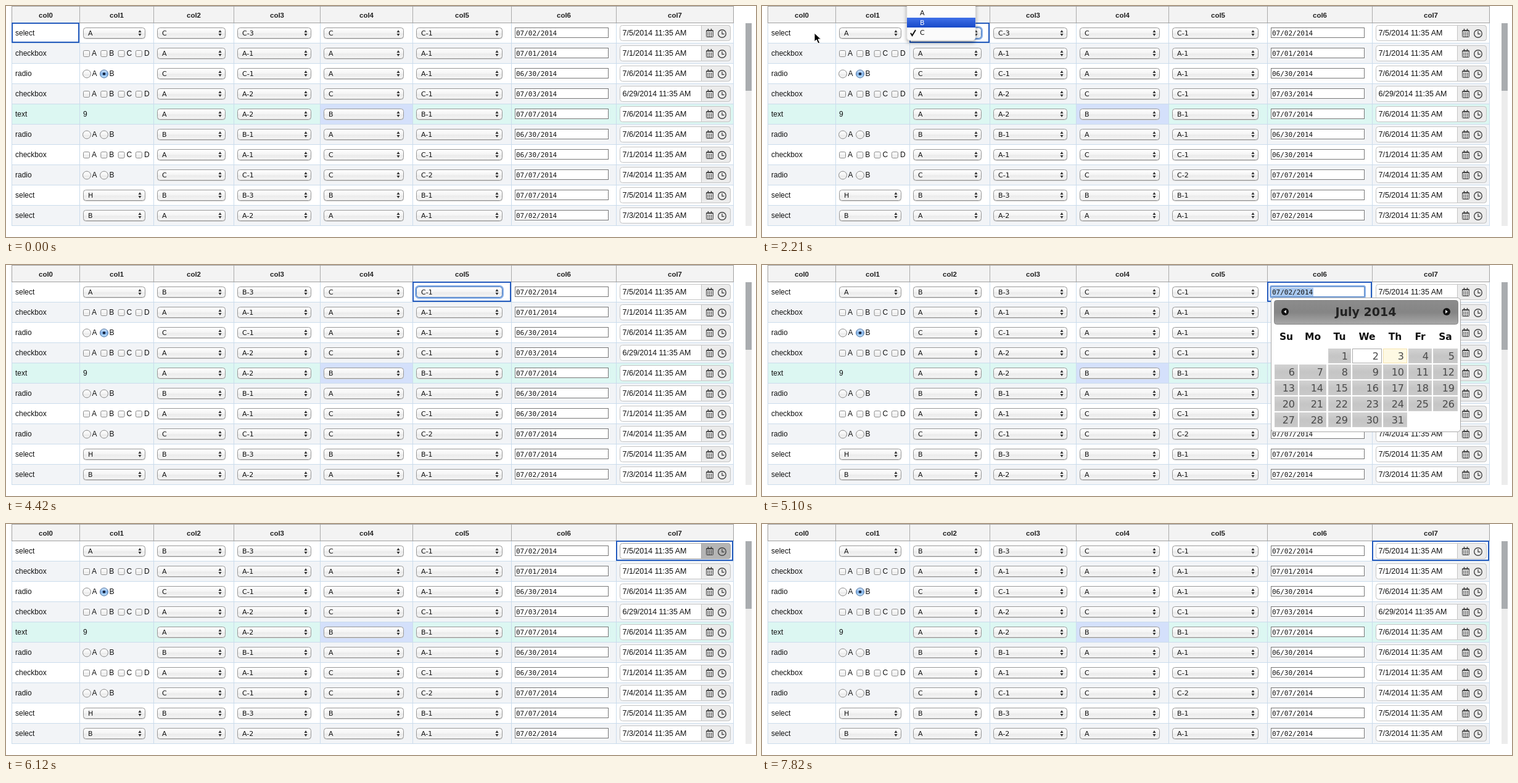
An HTML page for the animation above (7.99 s loop, 1216 px wide and 376 px high).

```html
<!DOCTYPE html>
<html lang="en">
<head>
<meta charset="utf-8">
<title>Grid editing</title>
<style>
  html, body { margin: 0; width: 100%; height: 100%; overflow: hidden; background: #fff; }
  svg { display: block; width: 1216px; height: 376px; }
  text { font-family: "Liberation Sans", Arial, sans-serif; font-size: 12px; fill: #111; white-space: pre; }
  .head { font-size: 11.5px; font-weight: bold; fill: #222; }
  .menu { font-family: "DejaVu Sans", sans-serif; font-size: 11px; }
  .mono { font-family: "DejaVu Sans Mono", monospace; font-size: 11px; }
  .time { font-size: 12.5px; }
  .day { font-family: "DejaVu Sans", sans-serif; font-size: 16px; fill: #4a4a4a; }
  .week { font-family: "DejaVu Sans", sans-serif; font-size: 15.5px; font-weight: bold; }
  .month { font-family: "DejaVu Sans", sans-serif; font-size: 19px; font-weight: bold; fill: #222; }
  .dim { fill: #999; }
  .white { fill: #fff; }
  .strong { fill: #fff; font-weight: bold; }
</style>
</head>
<body>
<svg viewBox="0 0 1216 376">
  <defs>
    <linearGradient id="button" x2="0" y2="1"><stop stop-color="#fff"/><stop offset=".5" stop-color="#f4f4f4"/><stop offset=".55" stop-color="#ebebeb"/><stop offset="1" stop-color="#f5f5f5"/></linearGradient>
    <linearGradient id="title" x2="0" y2="1"><stop stop-color="#8c8c8c"/><stop offset=".5" stop-color="#858585"/><stop offset="1" stop-color="#a8a8a8"/></linearGradient>
    <linearGradient id="cell" x2="0" y2="1"><stop stop-color="#d2d2d2"/><stop offset=".5" stop-color="#c5c5c5"/><stop offset="1" stop-color="#c9c9c9"/></linearGradient>
    <linearGradient id="choice" x2="0" y2="1"><stop stop-color="#3f70e8"/><stop offset="1" stop-color="#1749c8"/></linearGradient>
    <linearGradient id="radio" x2="0" y2="1"><stop stop-color="#d9ecff"/><stop offset=".5" stop-color="#82b2e8"/><stop offset="1" stop-color="#c2e6ff"/></linearGradient>
    <filter id="shadow" x="-20%" y="-20%" width="140%" height="150%"><feDropShadow dx="0" dy="3" stdDeviation="3" flood-opacity=".4"/></filter>
  </defs>
  <g id="scene"></g>
</svg>
<script>
const LOOP = 7990;
const EDGES = [9, 119, 239, 369, 509, 659, 819, 989, 1179];
const ROWS = [
  'select A C C-3 C C-1 07/02 7/5',
  'checkbox - A A-1 A A-1 07/01 7/1',
  'radio B C C-1 A A-1 06/30 7/6',
  'checkbox - A A-2 C C-1 07/03 6/29',
  'text 9 A A-2 B B-1 07/07 7/6',
  'radio - B B-1 A A-1 06/30 7/6',
  'checkbox - A A-1 C C-1 06/30 7/1',
  'radio - C C-1 C C-2 07/07 7/4',
  'select H B B-3 B B-1 07/07 7/5',
  'select B A A-2 A A-1 07/02 7/3'
].map(row => row.split(' '));

// start time, selected column, open overlay
const STEPS = [
  [0, 0], [680, 1], [1190, 2], [1700, 2, 'menuC'], [2040, 2, 'menuB'], [2720, 2],
  [3060, 3], [3570, 4], [4080, 5], [4760, 6, 'picker'], [5780, 7, 'hover'],
  [6290, 7, 'calendar'], [7480, 7]
];
const CHANGED_AT = 2720;

const rect = (x, y, w, h, fill, stroke = 'none', r = 0, extra = '') =>
  `<rect x="${x}" y="${y}" width="${w}" height="${h}" rx="${r}" fill="${fill}" stroke="${stroke}" ${extra}/>`;
const path = (d, fill = 'none', stroke = 'none', width = 1) =>
  `<path d="${d}" fill="${fill}" stroke="${stroke}" stroke-width="${width}"/>`;
const circle = (x, y, r, fill, stroke = 'none', width = 1) =>
  `<circle cx="${x}" cy="${y}" r="${r}" fill="${fill}" stroke="${stroke}" stroke-width="${width}"/>`;
const text = (x, y, s, cls = '', anchor = 'start') =>
  `<text x="${x}" y="${y}" class="${cls}" text-anchor="${anchor}">${s}</text>`;
const range = (n, draw) => Array.from({ length: n }, (_, i) => draw(i)).join('');
const glow = (x, y, w, h, r) =>
  rect(x - 1, y - 1, w + 2, h + 2, 'none', '#75a3e3', r, 'stroke-width="3" stroke-opacity=".85"');

function selectBox(x, y, w, label, focused) {
  const a = x + w - 9;
  return (focused ? glow(x + .5, y - 8.5, w - 1, 17, 5) : rect(x + .5, y - 7.5, w - 1, 17, 'none', '#ccc', 4)) +
    rect(x + .5, y - 8.5, w - 1, 17, 'url(#button)', focused ? '#4778bd' : '#979797', 4) +
    text(x + 8, y + 4, label, 'menu') +
    path(`M${a - 2.5} ${y - 1}h5l-2.5-4zm0 2h5l-2.5 4z`, '#333');
}

function checkboxes(y) {
  return range(4, i => {
    const x = 125.5 + i * 28.3;
    return rect(x, y - 4.5, 10, 10, 'url(#button)', '#8b8b8b', 2) + text(x + 13.5, y + 4, 'ABCD'[i]);
  });
}

function radios(y, value) {
  return range(2, i => {
    const x = 131 + i * 28, on = value === 'AB'[i];
    return circle(x, y + .5, 6.5, on ? 'url(#radio)' : 'url(#button)', on ? '#4a6f9f' : '#8b8b8b') +
      (on ? circle(x, y + .5, 2.3, '#14233f') : '') + text(x + 8.5, y + 4, 'AB'[i]);
  });
}

function dateBox(y, date, focused) {
  return (focused ? glow(825.5, y - 8.5, 151, 16, 2) : '') +
    rect(825.5, y - 8.5, 151, 16, '#fff', focused ? '#5a87c4' : '#777') +
    (focused ? rect(827, y - 7, 67, 14, '#a9c8ee') : '') +
    text(827, y + 4, date + '/2014', 'mono');
}

function timeBox(y, date, dark) {
  const edge = dark ? '#a5a5a5' : '#c4c4c4';
  let icon = rect(1135.5, y - 4.5, 11, 11, 'none', '#444', 1) +
    path(`M1135 ${y - 3.5}h12M1138.5 ${y - 7}v3M1143.5 ${y - 7}v3`, 'none', '#444', 1.6);
  icon += range(9, i => rect(1137 + i % 3 * 3, y - 1 + Math.floor(i / 3) * 2.5, 2, 1.5, '#555'));
  icon += circle(1161, y + 1, 6.3, 'none', '#444', 1.4) + path(`M1161 ${y - 3}v4.5h3.5`, 'none', '#444', 1.3);
  return rect(995.5, y - 12.5, 179, 25, '#fff', edge, 4) +
    path(`M1127.5 ${y - 12.5}h43q4 0 4 4v17q0 4-4 4h-43z`, dark ? '#b5b5b5' : '#ececec', edge) +
    icon + text(999.5, y + 4, date + '/2014 11:35 AM', 'time');
}

function firstWidget(row, y, focused) {
  const [kind, value] = row;
  if (kind === 'select') return selectBox(125, y, 101, value, focused);
  if (kind === 'checkbox') return checkboxes(y);
  if (kind === 'radio') return radios(y, value);
  return text(125, y + 4, value);
}

function gridRow(row, i, column, overlay) {
  const y = 44 + 33 * i, top = 28 + 33 * i;
  const active = i ? -1 : column;
  const fill = i === 4 ? '#dcf7f2' : i % 2 ? '#f2f4f7' : '#fff';
  let out = rect(9, top, 1171, 33, fill);
  if (i === 4) out += rect(510, top, 149, 32, '#d4e0fb');
  out += path(`M9 ${top + 32.5}H1180`, 'none', '#cbdcec');
  out += range(9, c => path(`M${EDGES[c] + .5} ${top}v33`, 'none', '#cbdcec'));
  out += text(15, y + 4, row[0]) + firstWidget(row, y, active === 1);
  out += range(4, k => {
    const c = k + 2;
    return selectBox(EDGES[c] + 6, y, EDGES[c + 1] - EDGES[c] - 20 + (k ? 0 : 1), row[c], active === c);
  });
  return out + dateBox(y, row[6], active === 6) +
    timeBox(y, row[7], active === 7 && (overlay === 'hover' || overlay === 'calendar'));
}

function header() {
  return rect(9.5, .5, 1170, 27, '#f3f3f3', '#a0a0a0') +
    range(8, c => (c ? path(`M${EDGES[c] + .5} 1v26`, 'none', '#aaa') : '') +
      text((EDGES[c] + EDGES[c + 1]) / 2 + .5, 19, 'col' + c, 'head', 'middle'));
}

function menu(choice) {
  const chosen = 'ABC'.indexOf(choice);
  const tick = chosen === 2 ? '#fff' : '#111';
  return rect(235, -12, 111, 68, '#fbfbfb', '#d5d5d5', 5, 'stroke-width=".5" filter="url(#shadow)"') +
    rect(235, 3 + chosen * 16, 111, 16, 'url(#choice)') +
    range(3, i => text(256, 15 + i * 16, 'ABC'[i], i === chosen ? 'menu white' : 'menu')) +
    path('M241 44l2.5 4 5.5-9', 'none', tick, 2) +
    path('M85 44v14l3.3-3 2.7 6 2.6-1.1-2.6-5.9h4.6z', '#000', '#fff');
}

function picker() {
  const left = [831, 871, 918, 957, 1007, 1048, 1088];
  const right = [869, 915, 955, 1005, 1046, 1086, 1128];
  const arrow = (x, d) => circle(x, 76, 6, '#111') + path(`M${x + 2 * d} 76l${-4 * d}-3v6z`, '#ddd');
  return rect(825.5, 53.5, 307, 218, '#fff', '#a8a8a8', 5) +
    rect(830.5, 57.5, 298, 39, 'url(#title)', '#888', 4) +
    arrow(848, -1) + arrow(1110, 1) + text(979, 83, 'July 2014', 'month', 'middle') +
    range(7, c => text((left[c] + right[c]) / 2, 122, 'Su Mo Tu We Th Fr Sa'.split(' ')[c], 'week', 'middle')) +
    range(31, i => {
      const slot = i + 2, c = slot % 7, y = 136 + Math.floor(slot / 7) * 26;
      const [fill, edge] = i === 1 ? ['#fff', '#aaa'] : i === 2 ? ['#fef9e3', '#f5e3ae'] : ['url(#cell)', '#cfcfcf'];
      return rect(left[c] + .5, y + .5, right[c] - left[c] - 1, 23, fill, edge) +
        text(right[c] - 5, y + 18, i + 1, 'day', 'end');
    });
}

function calendar() {
  const columnX = c => 1022 + c * 29.1;
  return path('M1105.5 37v14', 'none', '#111') +
    rect(995.5, 58.5, 208, 230, '#d9d9d9', '#b3b3b3', 4, 'filter="url(#shadow)"') +
    rect(998, 60, 203, 226, '#fff') + rect(998, 60, 203, 48, '#ececec') +
    path('M998 85.5h203M998 108.5h203', 'none', '#dcdcdc') +
    path('M1008 73l6-3v6zM1190 73l-6-3v6z', '#444') +
    text(1099, 77, 'July 2014', '', 'middle') +
    range(7, c => text(columnX(c), 102, 'Su Mo Tu We Th Fr Sa'.split(' ')[c], '', 'end')) +
    rect(1172, 109, 29, 25, '#f35800', 'none', 2) +
    range(42, i => {
      const n = i - 1, outside = n < 1 || n > 31;
      const label = n < 1 ? n + 30 : n > 31 ? n - 31 : n;
      const cls = n === 5 ? 'strong' : outside ? 'dim' : '';
      return text(columnX(i % 7), 124 + Math.floor(i / 7) * 24.4, label, cls, 'end');
    }) +
    text(1099, 274, 'Thursday, July 03, 2014', '', 'middle');
}

const overlays = { menuC: () => menu('C'), menuB: () => menu('B'), picker, calendar };

function draw([start, column, overlay]) {
  const rows = ROWS.map(row => [...row]);
  if (start >= CHANGED_AT) rows[0].splice(2, 2, 'B', 'B-3');
  const x = EDGES[column];
  return rows.map((row, i) => gridRow(row, i, column, overlay)).join('') + header() +
    rect(1199, 28, 10, 330, '#ececec') + rect(1199, 28, 10, 110, '#a9acaf') +
    rect(x + 1, 28, EDGES[column + 1] - x - 2, 31, 'none', '#245bbd', 0, 'stroke-width="2"') +
    (overlays[overlay] ? overlays[overlay]() : '');
}

const scene = document.getElementById('scene');
const began = performance.now();
let shown;

function tick() {
  const time = (performance.now() - began) % LOOP;
  const step = STEPS.findLast(s => s[0] <= time);
  if (step !== shown) {
    scene.innerHTML = draw(step);
    shown = step;
  }
  requestAnimationFrame(tick);
}
tick();
</script>
</body>
</html>
```
